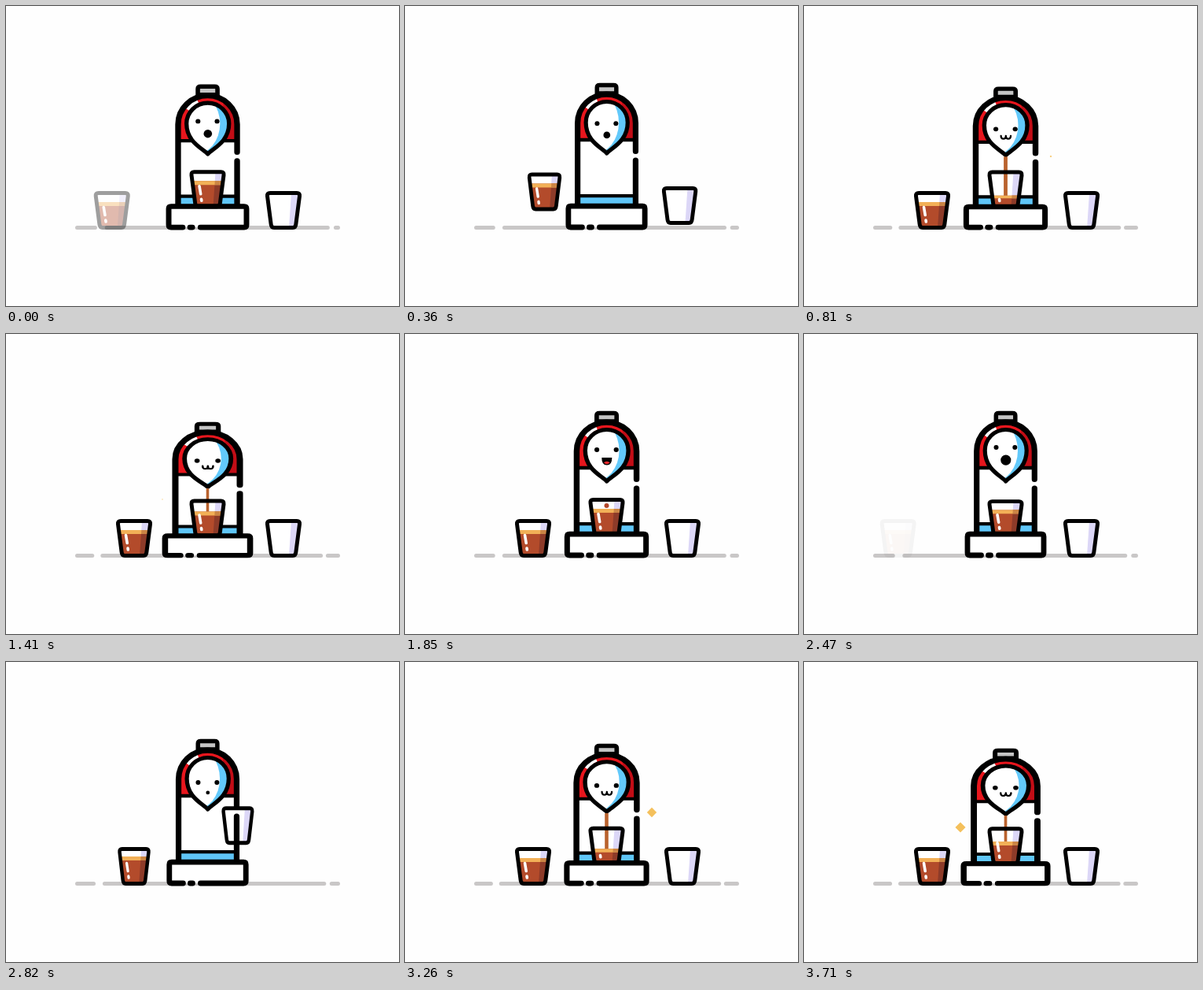
An HTML page that plays this animation: 500 by 381 pixels, repeating every 3.76 s.

```html
<!DOCTYPE html>
<html lang="en">
<head>
<meta charset="utf-8">
<title>Coffee machine</title>
<style>
  html, body { margin: 0; width: 100%; height: 100%; overflow: hidden; background: #fefefe; }
  svg { display: block; width: 100vw; height: 100vh; }
  .ink { stroke: #000; stroke-linecap: round; stroke-linejoin: round; }
  .line { fill: none; }
</style>
</head>
<body>
<svg viewBox="0 0 500 381" id="stage">
  <defs>
    <path id="glass" d="M-17-44H17Q21-44 20.5-40L15.8-4Q15.3 0 12 0H-12Q-15.3 0-15.8-4L-20.5-40Q-21-44-17-44Z"/>
    <clipPath id="glassClip"><use href="#glass"/></clipPath>
    <path id="drop" d="M256.700 187C249.700 179.500 230.200 171.500 230.200 148A26.500 26.500 0 0 1 283.200 148C283.200 171.500 263.700 179.500 256.700 187Z"/>
    <clipPath id="dropClip"><use href="#drop"/></clipPath>
    <path id="hood" d="M219.700 170V148.800A36.800 36.800 0 0 1 293.300 148.800V170Z"/>
    <clipPath id="hoodClip"><use href="#hood"/></clipPath>
  </defs>

  <path id="ground" class="line" stroke="#c9c7c7" stroke-width="5" stroke-linecap="round"/>

  <g class="body">
    <path class="ink" d="M244.300 111V103.500Q244.300 100.500 247.800 100.500H265.300Q268.800 100.500 268.800 103.500V111Z" fill="#c4c4c4" stroke-width="5.500"/>
    <path d="M219.700 169H293.300V254H219.700Z" fill="#fff"/>
    <use href="#hood" fill="#e8161d"/>
    <g clip-path="url(#hoodClip)">
      <path d="M276 105H300V172H276Z" fill="#c20d16"/>
      <path class="line" d="M231.500 130A31.500 31.500 0 0 1 244.200 119" stroke="#fff" stroke-width="5"/>
    </g>
    <path d="M219.700 241H293.300V254H219.700Z" fill="#5fc6f8"/>
    <path class="ink line" d="M221 170H293M221 241.200H293" stroke-width="4.300"/>
    <use href="#drop" fill="#62c9fb"/>
    <ellipse cx="240" cy="148" rx="32" ry="40" fill="#fff" clip-path="url(#dropClip)"/>
    <use href="#drop" class="ink line" stroke-width="5.200"/>
    <g id="eyes"><circle cx="244.500" r="3"/><circle cx="268.300" r="3"/></g>
    <g id="mouth">
      <circle id="gasp"/>
      <path id="purr" class="ink line" d="M-6-2Q-6 2-3 2Q0 2 0-2Q0 2 3 2Q6 2 6-2" stroke-width="2.200"/>
      <g id="grin">
        <path d="M-6.300-4H6.300Q6.500 5.500 0 5.500Q-6.500 5.500-6.300-4Z"/>
        <path d="M-3.800 2.300Q0-1 3.800 2.300Q2 4.300 0 4.300Q-2 4.300-3.800 2.300Z" fill="#ee2a2e"/>
      </g>
    </g>
    <path d="M208 254.500H305V281H208Z" fill="#fff"/>
  </g>

  <g id="cups"></g>

  <g class="body ink line" stroke-width="6.800">
    <path d="M219.700 252V148.800A36.800 36.800 0 0 1 293.300 148.800V184.500M293.300 196V252" stroke-width="7.200"/>
    <path d="M247.500 281H302Q305 281 305 278V257.200Q305 254.200 302 254.200H211Q208 254.200 208 257.200V278Q208 281 211 281H225.500M234.500 281H237.500"/>
  </g>

  <g id="sparks" fill="#f4c05c"></g>
</svg>
<script>
const LOOP = 3760, STEP = 88.2, CYCLE = 2345;
const $ = id => document.getElementById(id);

function add(parent, tag, attrs) {
  const el = document.createElementNS('http://www.w3.org/2000/svg', tag);
  parent.append(el);
  return set(el, attrs);
}
function set(el, attrs) {
  for (const k in attrs) el.setAttribute(k, attrs[k]);
  return el;
}
const show = (el, on) => { el.style.display = on ? '' : 'none'; };
const ramp = (t, a, b) => t <= a ? 0 : Math.min(1, (t - a) / (b - a));
const smooth = f => f * f * (3 - 2 * f);
const arc = f => Math.sin(Math.PI * f);

// Linear value from [time, value] pairs
function track(t, keys) {
  let [a, v] = keys[0];
  for (const [b, w] of keys) {
    if (t <= b) return v + (w - v) * ramp(t, a, b);
    a = b; v = w;
  }
  return v;
}

const SCALE_X = [[0, 1.02], [120, 1], [540, 1.005], [810, 1.035], [1005, 1.05], [1365, 1.1],
  [1410, 1.115], [1600, 1.12], [1765, 1.07], [1850, 1.035], [2000, 1], [2200, 1], [CYCLE, 1.02]];
const SCALE_Y = [[0, .99], [120, 1], [540, 1], [810, .973], [1005, .963], [1365, .935],
  [1410, .925], [1600, .92], [1765, .962], [1850, 1], [2200, 1], [CYCLE, .99]];
const EYE_Y = [[0, 145], [120, 144], [200, 144], [465, 153], [810, 153], [1400, 151],
  [1700, 151], [1850, 147], [CYCLE, 145]];
const MOUTH_Y = [[0, 161], [120, 160], [480, 166], [810, 163.5], [1365, 160], [1850, 161], [CYCLE, 161]];
const GASP = [[0, 5.2], [124, 6.6], [250, 6], [475, 2.4], [580, 1.5], [2200, 1.5], [CYCLE, 5.2]];
const LEVEL = [[620, 0], [810, -15.5], [1365, -28], [1410, -30.5], [1600, -32.5]];
const SPARKS = [[314, 191, 784], [199, 210, 1230]];

function makeCup() {
  const g = add($('cups'), 'g');
  add(g, 'use', { href: '#glass', fill: '#fff' });
  const inside = add(g, 'g', { 'clip-path': 'url(#glassClip)' });
  const layer = fill => add(inside, 'path', { fill });
  set(layer('#dcd7f7'), { d: 'M10-44H25V0H7Z' });
  const parts = {
    g,
    coffee: layer('#b34b2b'), shade: layer('#8d3b29'),
    foam: layer('#f2b057'), foamShade: layer('#cb8545')
  };
  const shine = d => add(inside, 'path', { d, stroke: '#fff', 'stroke-width': 3.6, 'stroke-linecap': 'round' });
  parts.long = shine('M-10.500-26L-8.800-16');
  parts.short = shine('M-8-9.500L-7.700-7.500');
  parts.stream = add(g, 'path', { fill: '#b9622d' });
  parts.drip = add(g, 'circle', { r: 3, fill: '#b4472a' });
  add(g, 'use', { href: '#glass', class: 'ink line', 'stroke-width': 5 });
  return parts;
}

// Each cup lives from its entry on the right to its exit on the left
function drawCup(cup, age, spout) {
  const fadeOut = smooth(ramp(age, 2 * CYCLE + 2100, 2 * CYCLE + 2518));
  const fadeIn = smooth(ramp(age, 560, 800));
  const alpha = fadeIn * (1 - fadeOut);
  show(cup.g, alpha > 0);
  if (!alpha) return;

  const local = age - CYCLE;
  const hopIn = ramp(local, 345, 565);
  const hopOut = ramp(local, CYCLE + 150, CYCLE + 390);
  const hop = 4 * (hopIn * (1 - hopIn) + hopOut * (1 - hopOut));
  const seated = hopIn === 1 && hopOut === 0;
  const x = 382 - 29 * fadeIn - 96.5 * hopIn - 93.5 * hopOut - 45 * fadeOut;
  const sag = seated ? (1 - track(local % CYCLE, SCALE_Y)) * 20 : 0;
  const y = 281.5 - 27 * hopIn + 27 * hopOut - 37 * hop + sag;
  const settle = arc(ramp(local, CYCLE + 390, CYCLE + 560));
  const crouch = arc(ramp(local, CYCLE, CYCLE + 230)) * (1 - hopOut);
  set(cup.g, {
    opacity: alpha,
    transform: `translate(${x} ${y}) scale(${1 - .11 * hop - .1 * settle} ${1 - .05 * crouch})`
  });

  const level = track(local, LEVEL) - 2 * settle;
  const foam = Math.min(5, -level * .25);
  const edge = 7 - level / 14;
  set(cup.coffee, { d: `M-25 ${level}H25V0H-25Z` });
  set(cup.shade, { d: `M${edge} ${level}H25V0H7Z` });
  set(cup.foam, { d: `M-25 ${level}H25V${level + foam}H-25Z` });
  set(cup.foamShade, { d: `M${edge} ${level}H25V${level + foam}H${edge - foam / 14}Z` });
  show(cup.long, level < -26);
  show(cup.short, level < -10);

  const top = spout - y;
  const head = top + (level - top) * ramp(local, 1600, 1700);
  const tip = top + (level - top) * ramp(local, 590, 660);
  const half = track(local, [[810, 2.4], [1410, 1.8], [1650, 1.2]]);
  show(cup.stream, local > 590 && local < 1700);
  set(cup.stream, { d: `M${-half} ${head}H${half}V${tip}H${-half}Z` });
  show(cup.drip, local > 1765 && local < 1890);
  set(cup.drip, { cy: track(local, [[1765, -64], [1852, -36.5], [1890, -31]]) });
}

const cups = Array.from({ length: 4 }, makeCup);
const sparks = SPARKS.map(() => add($('sparks'), 'path'));
const bodies = document.querySelectorAll('.body');

function draw(p) {
  const sx = track(p, SCALE_X), sy = track(p, SCALE_Y);
  for (const b of bodies) set(b, { transform: `translate(256.6 284) scale(${sx} ${sy}) translate(-256.6 -284)` });

  const sway = -Math.cos((p - 1110) / CYCLE * 2 * Math.PI);
  set($('ground'), {
    d: `M90.500 281.500H${111.3 + 2.2 * sway}M${125 + 3.2 * sway} 281.500H${404.2 + 5.2 * sway}` +
       `M${413.5 + 6 * sway} 281.500H422.500`
  });

  set($('eyes'), { transform: `translate(0 ${track(p, EYE_Y)})` });
  set($('mouth'), { transform: `translate(256.8 ${track(p, MOUTH_Y)})` });
  set($('gasp'), { r: track(p, GASP) });
  const purring = p >= 580 && p < 1740, grinning = p >= 1740 && p < 2200;
  show($('purr'), purring);
  show($('grin'), grinning);
  show($('gasp'), !purring && !grinning);

  const spout = 284 - 95 * sy;
  cups.forEach((cup, k) => drawCup(cup, p + k * CYCLE, spout));

  SPARKS.forEach(([x, y, start], i) => {
    const r = 8 * arc(ramp(p, start, start + 187));
    set(sparks[i], { d: `M${x} ${y - r}L${x + r} ${y}L${x} ${y + r}L${x - r} ${y}Z` });
  });
}

function tick() {
  const step = Math.floor(performance.now() % LOOP / 88);
  draw(step * STEP % CYCLE);
  requestAnimationFrame(tick);
}
tick();
</script>
</body>
</html>
```
